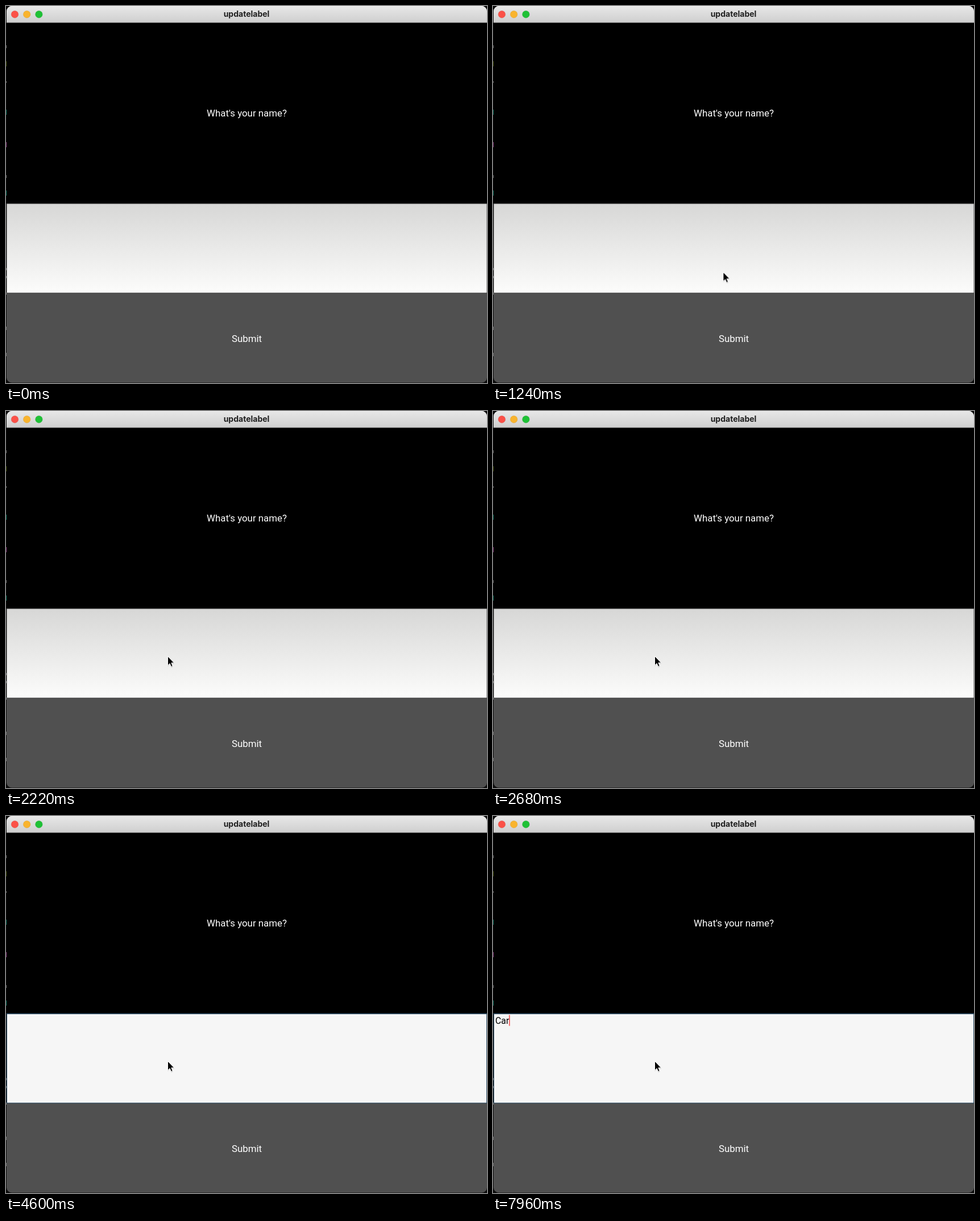
An HTML page for the animation above (8 s loop, 846 by 662 pixels).

```html
<!DOCTYPE html>
<html lang="en">
<head>
<meta charset="utf-8">
<title>updatelabel</title>
<style>
  html, body { margin: 0; width: 100%; height: 100%; overflow: hidden; background: #000; }
  svg { display: block; width: 846px; height: 662px; }
  text { font-family: Roboto, sans-serif; }
  .title { font: 700 14px Inter, sans-serif; fill: #1f1f1f; text-anchor: middle; }
  .label { font-size: 16.88px; fill: #fff; text-anchor: middle; }
  .entry { font-size: 15.83px; fill: #000; }

  .focused, .caret, .entry tspan { animation: 8s step-end infinite; }
  .focused { animation-name: focus; }
  .caret { animation-name: blink, type; animation-duration: 8s; }
  .c1 { animation-name: key1 !important; }
  .c2 { animation-name: key2 !important; }
  .c3 { animation-name: key3 !important; }
  .pointer { animation: move 8s linear infinite; }

  @keyframes focus { 0% { opacity: 0 } 34.75%, 100% { opacity: 1 } }
  @keyframes blink {
    0% { opacity: 0 }
    34.75% { opacity: 1 }
    50.5% { opacity: 0 }
    66.25%, 100% { opacity: 1 }
  }
  @keyframes type {
    0% { transform: none }
    82.5% { transform: translateX(10.3px) }
    86% { transform: translateX(18.9px) }
    97.75%, 100% { transform: translateX(24.3px) }
  }
  @keyframes key1 { 0% { fill-opacity: 0 } 82.5%, 100% { fill-opacity: 1 } }
  @keyframes key2 { 0% { fill-opacity: 0 } 86%, 100% { fill-opacity: 1 } }
  @keyframes key3 { 0% { fill-opacity: 0 } 97.75%, 100% { fill-opacity: 1 } }
  @keyframes move {
    0%, 10.74% { transform: translate(832px, 524px); opacity: 0 }
    10.75% { transform: translate(832px, 524px); opacity: 1 }
    15.5% { transform: translate(405px, 467px); opacity: 1; animation-timing-function: ease-out }
    19.5% { transform: translate(284px, 441px); opacity: 1 }
    21.25% { transform: translate(283px, 438.5px); opacity: 1; animation-timing-function: ease-out }
    28.75%, 100% { transform: translate(284px, 430px); opacity: 1 }
  }
</style>
</head>
<body>
<svg viewBox="0 0 846 662">
  <defs>
    <linearGradient id="bar" x2="0" y2="1">
      <stop stop-color="#e7e7e7"/><stop offset="1" stop-color="#cfcfcf"/>
    </linearGradient>
    <linearGradient id="field" x2="0" y2="1">
      <stop stop-color="#d7d7d6"/><stop offset="1" stop-color="#fcfcfb"/>
    </linearGradient>
    <clipPath id="window"><rect x="1" width="845" height="661.5" rx="9"/></clipPath>
  </defs>

  <rect width="846" height="662" fill="#0b0b0b"/>
  <g fill="none" stroke-width="1">
    <path d="M.5 69v5m0 58v3m0 162v5m0 158v4m0 10v4m0 25v4m0 56v6m0 40v6" stroke="#777"/>
    <path d="M.5 97v9" stroke="#4d5a16"/>
    <path d="M.5 182v9m0 133v9" stroke="#17806c"/>
    <path d="M.5 239v9" stroke="#9a4a90"/>
  </g>

  <g clip-path="url(#window)">
    <rect x="1" width="845" height="662"/>
    <rect x="1" width="845" height="29" fill="url(#bar)"/>
    <rect x="1" width="845" height="1" fill="#f3f3f3"/>
    <rect x="1" y="28.5" width="845" height="1" fill="#a9a9a9"/>
    <rect x="1" y="504" width="845" height="158" fill="#505050"/>
    <rect x="1" y="346.5" width="845" height="158" fill="#3a3a3a"/>
    <rect x="1.5" y="347.5" width="844" height="156" fill="url(#field)"/>
    <g class="focused">
      <rect x="1" y="346.5" width="845" height="158" fill="#284963"/>
      <rect x="2" y="348" width="843" height="155.5" fill="#f6f6f6"/>
    </g>
  </g>

  <g stroke-width=".5">
    <circle cx="15.5" cy="14.7" r="6.2" fill="#fb5148" stroke="#dd443d"/>
    <circle cx="36.7" cy="14.7" r="6.2" fill="#f9b42e" stroke="#dc9c25"/>
    <circle cx="57.9" cy="14.7" r="6.2" fill="#1fc136" stroke="#1ba72d"/>
  </g>
  <text class="title" x="423" y="19">updatelabel</text>
  <text class="label" x="423.5" y="194">What's your name?</text>
  <text class="label" x="423.5" y="590">Submit</text>

  <text class="entry" x="4" y="364.5"><tspan class="c1">C</tspan><tspan class="c2">a</tspan><tspan class="c3">r</tspan></text>
  <rect class="caret" x="4" y="349.5" width="1.2" height="19" fill="#f51414"/>

  <g class="pointer">
    <path d="M.5 1.8V18.2L4.3 14.6 6.8 20.2 9.6 19 7.2 13.4H12.3Z" fill="#000" opacity=".18"/>
    <path d="M.5 .5V16.6L4.1 13.2 6.5 18.7 9.2 17.5 6.8 12.1H11.7Z" stroke="#fff" stroke-width="1" stroke-linejoin="round"/>
  </g>
</svg>
</body>
</html>
```
